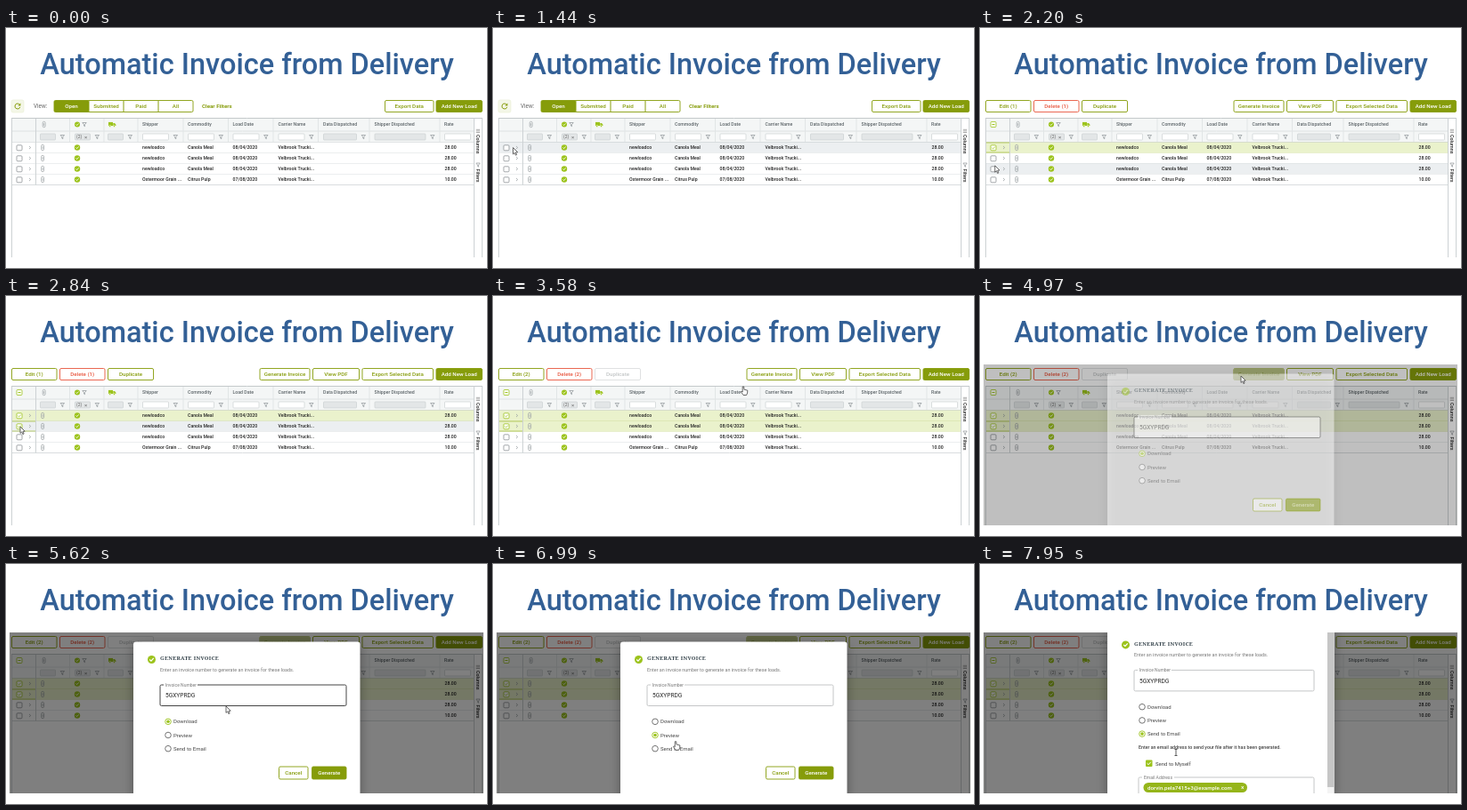
Write an HTML page with a canvas that moves like this. It is 540 px wide and 270 px high and loops after 8 s.

```html
<!DOCTYPE html>
<html lang="en">
<head>
<meta charset="utf-8">
<title>Automatic Invoice from Delivery</title>
<style>
  html, body { margin: 0; width: 100%; height: 100%; overflow: hidden; background: #fff; }
  canvas { display: block; width: 540px; height: 270px; }
</style>
</head>
<body>
<canvas id="stage" width="540" height="270"></canvas>
<script>
const ctx = document.getElementById('stage').getContext('2d');
const LOOP = 8000;
const GREEN = '#869c0a', LIME = '#9cc31c', RED = '#e8573f', INK = '#262626', GREY = '#9aa0a3';

const BURSTS = [
  [320, 1050, 8], [1160, 1820, 7], [1970, 2740, 8], [2840, 3420, 6], [3580, 3690, 2],
  [3900, 3900, 1], [4170, 4170, 1], [4320, 4320, 1], [4490, 4820, 4], [4970, 4970, 1],
  [5110, 5620, 6], [5770, 5770, 1], [5950, 5950, 1], [6230, 6420, 3], [6560, 6780, 3],
  [6990, 7290, 4], [7510, 7720, 3], [7950, 7950, 1]
];
const CURSOR = [
  [320, 90, 252], [530, 60, 190], [950, 20, 100], [1050, 20, 110], [1440, 23, 139],
  [1820, 16, 136], [1970, 16, 136], [2250, 17, 160], [2740, 16, 147], [2840, 16, 147],
  [2956, 18, 150], [3420, 200, 155], [3580, 281, 102], [3690, 287, 95], [4170, 287, 95],
  [4320, 290, 92], [4490, 293, 90], [4970, 293, 90], [5620, 247, 160], [5770, 223, 188],
  [5950, 204, 196], [6230, 203, 194], [6780, 203, 194], [7290, 208, 208], [7720, 208, 208],
  [7950, 220, 212]
];
const FADE = [[4710, 0], [4820, .08], [4970, .5], [5110, .85], [5230, 1]];
const EXPAND = [[7400, 0], [7720, 1]];

const ROWS = [
  ['newloadco', 'Canola Meal', '08/04/2020', '28.00'],
  ['newloadco', 'Canola Meal', '08/04/2020', '28.00'],
  ['newloadco', 'Canola Meal', '08/04/2020', '28.00'],
  ['Ostermoor Grain ...', 'Citrus Pulp', '07/08/2020', '10.00']
];
const CARRIER = 'Velbrook Trucki...';
const ROW_TOP = 128.5, ROW_H = 12;
// label, text x, filter box width, disabled
const COLUMNS = [
  ['', 38, 17, 1], ['', 77, 17, 1], ['', 114, 17, 1], ['Shipper', 153, 29, 0],
  ['Commodity', 204, 29, 0], ['Load Date', 254.5, 29, 0], ['Carrier Name', 305.5, 29, 0],
  ['Data Dispatched', 356, 37, 1], ['Shipper Dispatched', 413.5, 57, 1], ['Rate', 492, 29, 0]
];

function snap(t) {
  let shown = 0;
  for (const [a, b, n] of BURSTS) {
    if (t < a) break;
    const gap = n > 1 ? (b - a) / (n - 1) : 1;
    shown = a + gap * Math.min(n - 1, Math.floor((t - a) / gap + 1e-6));
  }
  return shown;
}

function sample(keys, t, i = 1) {
  if (t <= keys[0][0]) return keys[0][i];
  for (let k = 1; k < keys.length; k++) {
    const a = keys[k - 1], b = keys[k];
    if (t <= b[0]) return a[i] + (b[i] - a[i]) * (t - a[0]) / (b[0] - a[0]);
  }
  return keys[keys.length - 1][i];
}

function text(s, x, cy, size, color = INK, weight = 400, align = 'left', family = 'Roboto, sans-serif') {
  ctx.font = `${weight} ${size}px ${family}`;
  ctx.textAlign = align;
  ctx.fillStyle = color;
  ctx.fillText(s, x, cy + size * .355);
}

function box(x, y, w, h, fill, stroke, r = 0, lw = .8) {
  ctx.beginPath();
  ctx.roundRect(x, y, w, h, r);
  if (fill) { ctx.fillStyle = fill; ctx.fill(); }
  if (stroke) { ctx.strokeStyle = stroke; ctx.lineWidth = lw; ctx.stroke(); }
}

function path(points, stroke, lw = .8, fill) {
  ctx.beginPath();
  points.forEach(([x, y], i) => i ? ctx.lineTo(x, y) : ctx.moveTo(x, y));
  if (fill) { ctx.closePath(); ctx.fillStyle = fill; ctx.fill(); }
  if (stroke) { ctx.strokeStyle = stroke; ctx.lineWidth = lw; ctx.stroke(); }
}

function circle(x, y, r, fill, stroke, lw = .9) {
  ctx.beginPath();
  ctx.arc(x, y, r, 0, Math.PI * 2);
  if (fill) { ctx.fillStyle = fill; ctx.fill(); }
  if (stroke) { ctx.strokeStyle = stroke; ctx.lineWidth = lw; ctx.stroke(); }
}

const hline = (x1, x2, y, c) => path([[x1, y], [x2, y]], c, 1);
const vline = (x, y1, y2, c) => path([[x, y1], [x, y2]], c, 1);
const tick = (x, y, s, c, lw) => path([[x - s, y], [x - s * .25, y + s * .7], [x + s, y - s * .7]], c, lw);

function button(label, x1, x2, color = GREEN, filled = false, y = 81.5, h = 13, edge = color) {
  box(x1, y, x2 - x1, h, filled ? color : '#fff', edge, 1.5, .9);
  text(label, (x1 + x2) / 2, y + h / 2, 6.2, filled ? '#fff' : color, 500, 'center');
}

function badge(x, y, r) {
  circle(x, y, r, LIME);
  tick(x, y, r * .5, '#fff', r * .27);
}

function funnel(x, y, c = '#7d8488') {
  path([[x - 2.2, y - 2], [x + 2.2, y - 2], [x + .5, y + .2], [x + .5, y + 2.2], [x - .5, y + 1.6], [x - .5, y + .2], [x - 2.2, y - 2]], c, .6);
}

function clip(x, y) {
  box(x - 1.3, y - 3.2, 2.9, 6.4, null, GREY, 1.4, .7);
  vline(x + .1, y - 1.4, y + 1.7, '#b9bdbf');
}

function checkbox(x, y, checked) {
  box(x - 3, y - 3, 6, 6, '#fff', checked ? LIME : '#8d9296', 1, .8);
  if (checked) tick(x, y, 1.7, LIME, .8);
}

function truck(x, y) {
  box(x - 4, y - 2.6, 5, 4.2, LIME);
  path([[x + 1.3, y - 1.4], [x + 3, y - 1.4], [x + 4.4, y + .2], [x + 4.4, y + 1.6], [x + 1.3, y + 1.6]], null, 0, LIME);
  for (const dx of [-2.3, 2.5]) circle(x + dx, y + 1.9, 1, LIME, '#fff', .5);
}

function toolbar(t, count) {
  if (!count) {
    box(6, 81, 14, 14, '#f4f7e8', '#e7ecd2', 2, .6);
    ctx.beginPath();
    ctx.arc(13, 88, 3, .3, 5.4);
    ctx.strokeStyle = GREEN; ctx.lineWidth = 1; ctx.stroke();
    path([[16.4, 84.4], [16.4, 87.6], [13.3, 87.6]], null, 0, GREEN);
    text('View:', 31, 87.5, 6.4, '#666');
    box(54, 81.5, 156, 13, '#fff', GREEN, 1.5, .9);
    box(54, 81.5, 39, 13, GREEN, null, 1.5);
    ['Open', 'Submitted', 'Paid', 'All'].forEach((s, i) => {
      if (i) vline(54 + i * 39, 82, 94, GREEN);
      text(s, 73.5 + i * 39, 88, 6.2, i ? GREEN : '#fff', 500, 'center');
    });
    text('Clear Filters', 220, 88, 6.2, GREEN, 700);
    button('Export Data', 425.5, 480);
  } else {
    const many = count > 1;
    button(`Edit (${count})`, 6.5, 57);
    button(`Delete (${count})`, 60.5, 111, RED);
    button('Duplicate', 114.5, 165.5, many ? '#c2c5c6' : GREEN, false, 81.5, 13, many ? '#dcdedf' : GREEN);
    button('Generate Invoice', 285, 341);
    if (t >= 4320) pressGenerate(t);
    button('View PDF', 344.5, 396.5);
    button('Export Selected Data', 400, 479.5);
  }
  button('Add New Load', 483, 534.5, GREEN, true);
}

function pressGenerate(t) {
  ctx.save();
  ctx.beginPath();
  ctx.roundRect(285, 81.5, 56, 13, 1.5);
  ctx.clip();
  box(285, 81, 56, 14, t < 4490 ? '#f1f4e0' : '#dde3bd');
  if (t >= 4490) circle(293, 90, Math.min(60, 10 + (t - 4490) * .085), '#bdc887');
  ctx.restore();
  text('Generate Invoice', 313, 88, 6.2, t < 4490 ? GREEN : '#8b9a3c', 500, 'center');
}

function grid(t, count, hover) {
  box(6, 101.5, 519, 27, '#f4f6f6');
  hline(6, 535, 101.5, '#c4c9cb');
  hline(6, 525, 116, '#dde1e2');
  hline(6, 525, 128.5, '#c4c9cb');
  for (const x of [71.5, 110, 148, 199, 249.5, 300, 350.5, 408, 487]) vline(x, 102, 128, '#e1e5e6');

  if (count) {
    box(12, 105.5, 6, 6, '#fff', LIME, 1);
    hline(13.5, 16.5, 108.5, LIME);
  }
  clip(42.5, 108.5);
  badge(80, 108.5, 3);
  funnel(88, 108.5);
  truck(119, 108.5);

  COLUMNS.forEach(([label, x, w, off], i) => {
    text(label, x, 108.5, 5.2, '#5f676b', 500);
    box(x + .5, 119, w, 7, off ? '#e3e6e7' : '#fff', '#cbd0d2', .8, .7);
    if (i < 9) funnel(x + w + 8.3, 122.5);
  });
  text('(2)', 79, 122.5, 5, '#666');
  text('×', 88, 122.5, 6, '#666');

  ROWS.forEach(([shipper, goods, date, rate], i) => {
    const y = ROW_TOP + i * ROW_H, cy = y + 6;
    const chosen = i < count;
    const fill = chosen ? '#eaf2cc' : i === hover ? '#eceff1' : '#fff';
    box(6, y, 519, ROW_H, fill);
    hline(6, 525, y + ROW_H, chosen ? '#d3dfa0' : '#d9dddf');
    checkbox(15, cy + .3, t >= (i === 0 ? 1970 : i === 1 ? 2840 : Infinity));
    path([[26, cy - 1.6], [27.7, cy], [26, cy + 1.6]], GREY, .8);
    clip(41, cy);
    badge(80, cy, 3.2);
    text(shipper, 153, cy, 5.2, INK, 500);
    text(goods, 204, cy, 5.2, INK, 500);
    text(date, 254.5, cy, 5.2, INK, 500);
    text(CARRIER, 305.5, cy, 5.2, INK, 500);
    text(rate, 492.5, cy, 5.2, INK, 500);
  });
  if (t >= 1970) box(6.5, ROW_TOP + (t >= 2840 ? ROW_H : 0) + .5, 27, 11, null, '#a9c04a', 0, .8);

  vline(33.5, 102, 176.5, '#cdd2d4');
  vline(6.5, 101.5, 258, '#cdd2d4');
  vline(525.5, 101.5, 258, '#cdd2d4');
  vline(534.5, 101.5, 258, '#cdd2d4');
  for (let i = 0; i < 3; i++) path([[527.7, 114.3 + i * 1.6], [532, 114.3 + i * 1.6]], '#777', .6);
  funnel(530, 154);
  sideLabel('Columns', 120);
  sideLabel('Filters', 158.5);
}

function sideLabel(s, y) {
  ctx.save();
  ctx.translate(530, y);
  ctx.rotate(Math.PI / 2);
  text(s, 0, 0, 5.4, INK, 500);
  ctx.restore();
}

function field(label, x, y, right, h, edge, labelW) {
  box(x, y, right - x, h, '#fff', edge, 1.5, 1);
  box(x + 4, y - 2, labelW, 4, '#fff');
  text(label, x + 6, y, 5, '#777');
}

function dialog(t, fade, open) {
  ctx.globalAlpha = fade * .5;
  box(4, 77, 532, 181, '#000');
  ctx.globalAlpha = fade;
  ctx.save();
  ctx.shadowColor = `rgba(0,0,0,${.35 * fade})`;
  ctx.shadowBlur = 12;
  ctx.shadowOffsetY = 3;
  box(143, 87.5 - open * 16.5, 254.5, 190, '#fff', null, 3);
  ctx.restore();

  const right = open ? 375 : 382;
  ctx.save();
  ctx.translate(0, -16.6 * open);
  badge(163.5, 107.5, 4.5);
  ctx.letterSpacing = '.3px';
  text('GENERATE INVOICE', 173, 106, 6, '#34424a', 700, 'left', '"Noto Serif", serif');
  ctx.letterSpacing = '0px';
  text('Enter an invoice number to generate an invoice for these loads.', 173, 119, 5.4, '#777');
  field('Invoice Number', 173, 136, right, 23.5, t < 5770 ? '#444' : '#c4c6c7', 38);
  text('5GXYPRDG', 179, 148, 6.6);

  const picked = t < 6560 ? 0 : t < 7510 ? 1 : 2;
  ['Download', 'Preview', 'Send to Email'].forEach((s, i) => {
    const y = 177.3 + i * 15.2;
    circle(182, y, 3.3, '#fff', i === picked ? LIME : '#666');
    if (i === picked) circle(182, y, 1.8, LIME);
    text(s, 188, y, 6, '#444');
  });
  if (!open) {
    button('Cancel', 306.5, 339, GREEN, false, 228, 14);
    button('Generate', 343.5, 382, GREEN, true, 228, 14);
  }
  ctx.restore();
  if (open) emailFields(open, right);
  ctx.globalAlpha = 1;
}

function emailFields(open, right) {
  ctx.save();
  ctx.globalAlpha = open;
  ctx.translate(0, 16.6 * (1 - open));
  text('Enter an email address to send your file after it has been generated.', 178, 206, 5.3, '#444', 500);
  box(186, 220.5, 7.5, 7.5, LIME, null, 1);
  tick(189.7, 224.2, 2.2, '#fff', 1);
  text('Send to Myself', 197, 224.5, 6, '#444');
  field('Email Address', 178, 240, right, 30, '#c4c6c7', 36);
  box(183.5, 246, 116.5, 11, '#95b51a', null, 5.5);
  text('dorvin.pela7415+3@example.com', 188, 251.5, 6.2, '#fff', 500);
  text('×', 293, 251.5, 6.5, '#fff', 500);
  ctx.restore();
  box(390, 77, 7.5, 181, '#f4f4f4');
  box(390, 77, 7.5, 174, '#c6c6c6');
}

function pointer(t) {
  if (t < 320) return;
  ctx.save();
  ctx.translate(sample(CURSOR, t, 1), sample(CURSOR, t, 2));
  ctx.lineJoin = 'round';
  if (t >= 7950) {
    path([[-1.5, -3.5], [1.5, -3.5]], '#333', .8);
    path([[0, -3.5], [0, 3.5]], '#333', .8);
    path([[-1.5, 3.5], [1.5, 3.5]], '#333', .8);
  } else if ((t >= 3580 && t < 3900) || t >= 5950) {
    path([[-.8, 0], [.7, 0], [.9, 3.2], [4.8, 4.2], [4.6, 7], [3.6, 9.5], [0, 9.5], [-2.6, 5.8], [-2, 5], [-.8, 6], [-.8, 0]], '#444', .8, '#fff');
  } else {
    path([[0, 0], [0, 7.4], [1.7, 5.9], [2.9, 8.6], [4.1, 8], [2.9, 5.4], [5.2, 5.2], [0, 0]], '#444', .8, '#fff');
  }
  ctx.restore();
}

function hoveredRow(t) {
  if (t < 320 || t >= 3580) return -1;
  return Math.floor((sample(CURSOR, t, 2) - ROW_TOP) / ROW_H);
}

function draw(now) {
  const t = snap(now % LOOP);
  const count = t < 1970 ? 0 : t < 2950 ? 1 : 2;
  ctx.fillStyle = '#fff';
  ctx.fillRect(0, 0, 540, 270);
  text('Automatic Invoice from Delivery', 270.5, 40.5, 32.5, '#336096', 500, 'center');
  ctx.save();
  ctx.beginPath();
  ctx.rect(4, 77, 532, 181);
  ctx.clip();
  toolbar(t, count);
  grid(t, count, hoveredRow(t));
  const fade = sample(FADE, t);
  if (fade) dialog(t, fade, sample(EXPAND, t >= 7510 ? t : 0));
  pointer(t);
  ctx.restore();
}

function loop() {
  draw(performance.now());
  requestAnimationFrame(loop);
}
loop();
</script>
</body>
</html>
```
